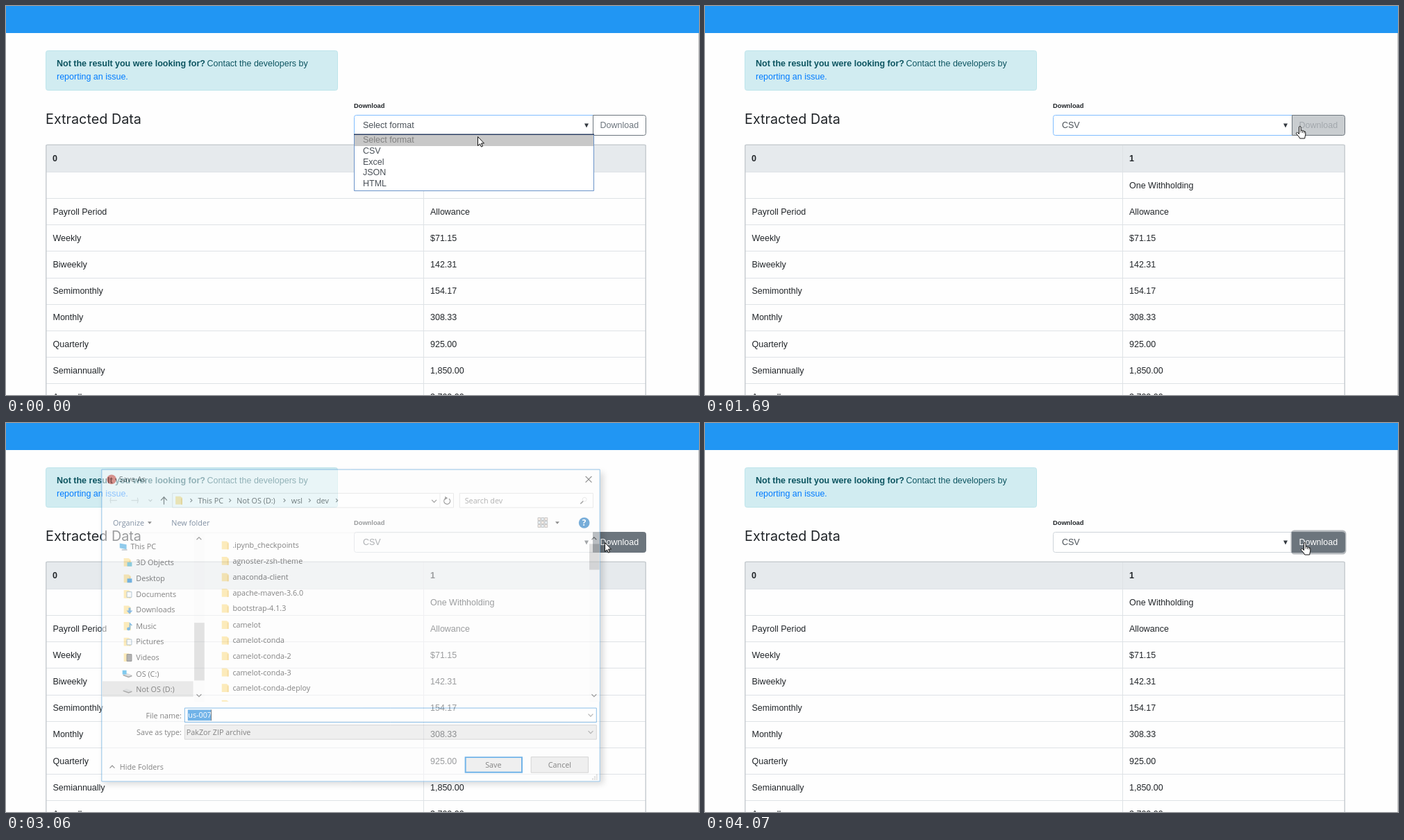
An HTML page with a canvas that plays this animation: 998 px wide and 561 px high, repeating every 5710 ms.

```html
<!DOCTYPE html>
<html lang="en">
<head>
<meta charset="utf-8">
<title>Extracted Data</title>
<style>
html, body { margin: 0; width: 100%; height: 100%; overflow: hidden; background: #fff; }
canvas { display: block; }
</style>
</head>
<body>
<canvas id="stage" width="998" height="561"></canvas>
<script>
const W = 998, H = 561, LOOP = 5710;
const stage = document.getElementById('stage').getContext('2d');
const layer = document.createElement('canvas');
layer.width = W;
layer.height = H;
const dlg = layer.getContext('2d');

const ARIAL = '"Liberation Sans", Arial, sans-serif';
const BODY = '12.5px ' + ARIAL;
const BOLD = 'bold 12.5px ' + ARIAL;
const UI = '11px "Open Sans", "Noto Sans", sans-serif';

const clamp = v => Math.max(0, Math.min(1, v));
const ramp = (t, from, to) => clamp((t - from) / (to - from));
const mix = (a, b, p) => a + (b - a) * p;
const blend = (a, b, p) => `rgb(${a.map((v, i) => Math.round(mix(v, b[i], p))).join(',')})`;

function text(c, str, x, y, color, font = BODY, align = 'left') {
  c.font = font;
  c.fillStyle = color;
  c.textAlign = align;
  c.fillText(str, x, y);
}
function fill(c, x, y, w, h, color) {
  c.fillStyle = color;
  c.fillRect(x, y, w, h);
}
function box(c, x, y, w, h, bg, border, radii = 0, line = 1) {
  c.beginPath();
  c.roundRect(x + line / 2, y + line / 2, w - line, h - line, radii);
  if (bg) { c.fillStyle = bg; c.fill(); }
  c.lineWidth = line;
  c.strokeStyle = border;
  c.stroke();
}
function trace(c, pts, color, width = 1.2) {
  c.beginPath();
  pts.forEach(([x, y]) => c.lineTo(x, y));
  c.lineWidth = width;
  c.strokeStyle = color;
  c.stroke();
}
function poly(c, pts, color) {
  c.beginPath();
  pts.forEach(([x, y]) => c.lineTo(x, y));
  c.closePath();
  c.fillStyle = color;
  c.fill();
}
function disc(c, x, y, r, color) {
  c.beginPath();
  c.arc(x, y, r, 0, 7);
  c.fillStyle = color;
  c.fill();
}
const triangle = (c, x, y, w, h, color) =>
  poly(c, [[x - w / 2, y - h / 2], [x + w / 2, y - h / 2], [x, y + h / 2]], color);

// dir: 'u', 'd' or 'r'
function chevron(c, x, y, dir, color = '#555', s = 3.5) {
  const k = s / 2;
  const pts = {
    u: [[x - s, y + k], [x, y - k], [x + s, y + k]],
    d: [[x - s, y - k], [x, y + k], [x + s, y - k]],
    r: [[x - k, y - s], [x + k, y], [x - k, y + s]]
  };
  trace(c, pts[dir], color);
}

/* ---------- web page ---------- */
const ROWS = [
  ['', 'One Withholding'], ['Payroll Period', 'Allowance'], ['Weekly', '$71.15'],
  ['Biweekly', '142.31'], ['Semimonthly', '154.17'], ['Monthly', '308.33'],
  ['Quarterly', '925.00'], ['Semiannually', '1,850.00'], ['Annually', '3,700.00']
];
const FORMATS = ['Select format', 'CSV', 'Excel', 'JSON', 'HTML'];

function drawTable(c) {
  fill(c, 57, 200, 865, 39, '#e6eaed');
  const grid = '#dee2e6';
  for (let i = 0; i < 9; i++) fill(c, 57, Math.round(238.8 + 38.2 * i), 865, 1, grid);
  fill(c, 601, 200, 1, 361, grid);
  box(c, 57, 199.5, 865, 400, null, '#c8cdd1', 2, 1.5);
  text(c, '0', 67, 224, '#212529', BOLD);
  text(c, '1', 611, 224, '#212529', BOLD);
  ROWS.forEach((row, i) => {
    const y = Math.round(262.6 + 38.15 * i);
    text(c, row[0], 67.5, y, '#212529');
    text(c, row[1], 611, y, '#212529');
  });
}

function drawForm(c, t) {
  const picked = t >= 1025;
  const leave = ramp(t, 2020, 2170);
  const hover = ramp(t, 1640, 1780);
  const ring = t >= 2860 && t < 4070 ? 0 : leave;

  text(c, 'Download', 501, 147, '#212529', 'bold 9.3px ' + ARIAL);
  box(c, 501, 157, 346, 30, '#fff', blend([128, 189, 255], [206, 212, 218], leave), [3, 0, 0, 3]);
  text(c, picked ? 'CSV' : FORMATS[0], 514, 176, '#495057');
  triangle(c, 836, 172.5, 6, 6, '#343a40');

  if (ring) box(c, 843.5, 154.5, 80, 35, null, `rgba(108,117,125,${0.5 * ring})`, 4, 2.5);
  box(c, 845, 157, 77, 30, blend([255, 255, 255], [108, 117, 125], hover), '#6c757d', [0, 3, 3, 0]);
  text(c, 'Download', 855.5, 176, blend([108, 117, 125], [255, 255, 255], hover));
}

function drawMenu(c, active) {
  box(c, 501, 185, 346, 82, '#fff', '#6a93c9');
  fill(c, 501, 184.5, 346, 1.5, '#2c3f63');
  fill(c, 502, active ? 202 : 186, 344, 16, active ? '#1e90ff' : '#c8c8c8');
  FORMATS.forEach((name, i) => {
    const color = i === 0 ? '#808080' : i === active ? '#fff' : '#495057';
    text(c, name, 514, Math.round(197 + 15.8 * i), color);
  });
}

function drawPage(c, t) {
  fill(c, 0, 0, W, H, '#fefefe');
  fill(c, 997, 39, 1, 522, '#c9c9c9');
  fill(c, 0, 0, W, 39, '#2196f3');
  box(c, 57, 64, 421, 58, '#d1ecf1', '#bee5eb', 3);
  text(c, 'Not the result you were looking for?', 73, 87, '#0c5460', BOLD);
  text(c, 'Contact the developers by', 289.5, 87, '#0c5460');
  text(c, 'reporting an issue.', 73, 106, '#007bff');
  text(c, 'Extracted Data', 57, 170, '#212529', '19.8px Inter, sans-serif');
  drawTable(c);
  drawForm(c, t);
}

/* ---------- save dialog ---------- */
const PLACES = ['This PC', '3D Objects', 'Desktop', 'Documents', 'Downloads', 'Music',
  'Pictures', 'Videos', 'OS (C:)', 'Not OS (D:)'];
const FILES = ['.ipynb_checkpoints', 'agnoster-zsh-theme', 'anaconda-client', 'apache-maven-3.6.0',
  'bootstrap-4.1.3', 'camelot', 'camelot-conda', 'camelot-conda-2', 'camelot-conda-3',
  'camelot-conda-deploy', 'camelot-docs'];
const INK = '#222';

function folder(c, x, y) {
  poly(c, [[x - 5, y - 6], [x + 2, y - 6], [x + 5, y - 4], [x + 5, y + 6], [x - 5, y + 6]], '#fbdc86');
  fill(c, x + 3, y - 3, 2, 9, '#eec45c');
}

function placeIcon(c, i, y) {
  if (i === 0) {
    poly(c, [[157, y - 5], [167, y - 3], [167, y + 4], [157, y + 2]], '#38a3df');
    fill(c, 160, y + 4, 8, 1.5, '#8997a0');
  } else if (i > 7) {
    poly(c, [[162, y + 1], [167, y - 1], [175, y + 2], [170, y + 5]], '#c4c7c9');
    trace(c, [[162, y + 2], [170, y + 5], [175, y + 3]], '#666', 1.5);
    if (i === 8) fill(c, 161, y - 5, 6, 6, '#1ba1e2');
  } else {
    folder(c, 168, y);
    if (i === 3 || i === 6) box(c, 167, y - 4, 8, 9, '#f4f8fa', '#7c9db2');
    else if (i === 7) box(c, 167, y - 5, 8, 11, '#777', '#444');
    else if (i === 4) poly(c, [[170, y - 3], [173, y - 3], [173, y + 1], [176, y + 1], [171.5, y + 6], [167, y + 1], [170, y + 1]], '#2f86cf');
    else if (i === 5) {
      disc(c, 170, y + 4, 2.5, '#2188d0');
      trace(c, [[172, y + 4], [172, y - 4], [175, y - 1]], '#2188d0', 1.5);
    } else fill(c, 168, y, 7, 6, i === 1 ? '#43b3d0' : '#1685d5');
  }
}

function scrollbar(c, x, top, height, color) {
  fill(c, x - 7, 156, 15, 248, '#fafafa');
  fill(c, x - 7, top, 15, height, color);
  chevron(c, x, 164, 'u');
  chevron(c, x, 395, 'd');
}

function navigation(c) {
  const arrow = (x, d, color) => {
    trace(c, [[x - 5, 108], [x + 5, 108]], color);
    trace(c, [[x + d, 104], [x + d * 5 / 4, 108], [x + d, 112]], color);
  };
  arrow(148, -4, '#cfcfcf');
  arrow(179, 4, '#cfcfcf');
  chevron(c, 202, 108, 'd', '#bbb', 2.5);
  trace(c, [[222, 114], [222, 103]], '#444', 1.3);
  trace(c, [[217.5, 108], [222, 103], [226.5, 108]], '#444', 1.3);

  box(c, 234, 97, 414, 22, '#fff', '#d9d9d9');
  folder(c, 244, 108);
  [262, 319, 399, 436, 476].forEach(x => chevron(c, x, 108, 'r', '#555', 2.5));
  [['This PC', 272], ['Not OS (D:)', 329], ['wsl', 409], ['dev', 446]]
    .forEach(([s, x]) => text(c, s, x, 112, INK, UI));
  chevron(c, 619, 109, 'd');
  fill(c, 627, 98, 1, 20, '#dedede');
  c.beginPath();
  c.arc(638, 109, 4.5, -0.9, 4.3);
  c.strokeStyle = '#555';
  c.lineWidth = 1.3;
  c.stroke();
  poly(c, [[635, 102], [639, 104.5], [635, 107]], '#555');

  box(c, 656, 97, 197, 22, '#fff', '#d9d9d9');
  text(c, 'Search dev', 664, 112, '#777', UI);
  c.beginPath();
  c.arc(840, 106.5, 3, 0, 7);
  c.stroke();
  trace(c, [[838, 109], [834, 113]], '#555', 1.5);
}

function toolbar(c) {
  text(c, 'Organize', 147, 145, '#1e395b', UI);
  triangle(c, 201, 141, 6, 3.5, '#333');
  text(c, 'New folder', 233, 145, '#1e395b', UI);
  for (let i = 0; i < 9; i++) {
    box(c, 771 + (i % 3) * 5, 133 + Math.floor(i / 3) * 5, 5, 5, i % 2 ? '#d8e5ef' : '#f1dfd3', '#9a9a9a');
  }
  triangle(c, 800, 141, 6, 3.5, '#333');
  disc(c, 839.5, 141, 8, '#0c6cbc');
  text(c, '?', 839.5, 145.5, '#fff', 'bold 12px "Open Sans", sans-serif', 'center');
  fill(c, 131, 155, 731, 1, '#eeeeee');
}

function lists(c) {
  fill(c, 131, 374, 134, 23, '#d9d9d9');
  PLACES.forEach((name, i) => {
    const y = Math.round(176 + 23.35 * i);
    placeIcon(c, i, y);
    text(c, name, i ? 181 : 173, y + 4, INK, UI);
  });
  scrollbar(c, 273.5, 288, 85, '#cdcdcd');

  c.save();
  c.beginPath();
  c.rect(290, 156, 556, 248);
  c.clip();
  FILES.forEach((name, i) => {
    const y = Math.round(174 + 23.35 * i);
    folder(c, 312, y);
    text(c, name, 323, y + 4, INK, UI);
  });
  c.restore();
  scrollbar(c, 854, 172, 38, '#c4c4c4');
}

function fields(c, focused, caret) {
  text(c, 'File name:', 248, 429, INK, UI, 'right');
  box(c, 252, 413, 606, 22, '#fff', '#2b8ad6');
  if (focused) fill(c, 257, 416, 35, 16, '#0078d7');
  text(c, 'us-007', 257.5, 428, focused ? '#fff' : INK, UI);
  if (caret) fill(c, 291, 416, 1, 16, '#222');
  chevron(c, 849, 424, 'd', '#777');

  text(c, 'Save as type:', 248, 453, INK, UI, 'right');
  box(c, 252, 438, 606, 22, '#e3e3e3', '#b9b9b9');
  text(c, 'PakZor ZIP archive', 255, 453, INK, UI);
  chevron(c, 849, 449, 'd', '#777');

  chevron(c, 146, 500, 'u', '#333');
  text(c, 'Hide Folders', 157, 504, INK, UI);
  box(c, 664, 485, 85, 24, '#e3e3e3', '#0078d7', 0, 2);
  text(c, 'Save', 706, 501, INK, UI, 'center');
  box(c, 761, 485, 85, 24, '#e3e3e3', '#b3b3b3');
  text(c, 'Cancel', 803.5, 501, INK, UI, 'center');
  for (let i = 0; i < 3; i++) {
    for (let j = 2 - i; j < 3; j++) fill(c, 851 + j * 3, 511 + i * 3, 2, 2, '#bbb');
  }
}

function drawDialog(t) {
  const opening = ramp(t, 2870, 3215);
  const closing = ramp(t, 3800, 3955);
  const alpha = opening * (1 - closing);
  if (!alpha) return;
  const scale = mix(0.9, 1, 1 - (1 - opening) ** 2) - 0.07 * closing ** 2;
  const focused = t < 3800, c = dlg;

  c.setTransform(1, 0, 0, 1, 0, 0);
  c.clearRect(0, 0, W, H);
  c.translate(496.5, 292);
  c.scale(scale, scale);
  c.translate(-496.5, -292);

  c.save();
  c.shadowColor = focused ? 'rgba(0,0,0,.28)' : 'rgba(0,0,0,.16)';
  c.shadowBlur = 9;
  c.shadowOffsetX = 4;
  c.shadowOffsetY = 4;
  fill(c, 130, 62, 733, 460, '#fdfdfd');
  c.restore();
  box(c, 130, 62, 733, 460, '#fdfdfd', focused ? '#3c93d6' : '#6aa5d4');

  if (focused) disc(c, 145, 77, 7, '#db4a3d');
  text(c, 'Save As', focused ? 156 : 138, 81, INK, UI);
  trace(c, [[841.5, 72.5], [850.5, 81.5]], '#333');
  trace(c, [[850.5, 72.5], [841.5, 81.5]], '#333');
  navigation(c);
  toolbar(c);
  lists(c);
  fields(c, focused, focused && t < 3500);

  stage.globalAlpha = alpha;
  stage.drawImage(layer, 0, 0);
  stage.globalAlpha = 1;
}

/* ---------- pointer ---------- */
const ARROW = new Path2D('M0 0V13L3 10.3L5 14.6L7 13.7L5 9.5H9Z');
const HAND = new Path2D('M0 1.5Q0 0 1.3 0Q2.6 0 2.6 1.5V6Q4.6 5 5 6.6Q7 5.8 7.4 7.4' +
  'Q9.3 6.9 9.3 9V12.5Q8.6 14 8.2 17.5H1.2Q0 14.5-3.8 11Q-4.6 9.4-3.2 8.8Q-1.8 8.8 0 11Z');

function pointer(t) {
  if (t < 610) {
    const p = Math.sin(ramp(t, 0, 550) * Math.PI / 2);
    return [mix(679, 672, p), mix(188, 205, p)];
  }
  if (t < 790) return null;
  if (t < 1290) return [671, 199];
  const p = Math.sin(ramp(t, 1290, 1780) * Math.PI / 2);
  return [mix(684, 862, p), mix(205, 172, p)];
}

function drawPointer(c, pos, hand) {
  if (!pos) return;
  c.save();
  c.translate(Math.round(pos[0]) + 0.5, Math.round(pos[1]) + 0.5);
  c.fillStyle = '#fff';
  c.strokeStyle = '#111';
  c.lineWidth = 1;
  c.lineJoin = 'round';
  const shape = hand ? HAND : ARROW;
  c.fill(shape);
  c.stroke(shape);
  if (hand) {
    trace(c, [[5, 6.6], [5, 9.5]], '#111', 0.8);
    trace(c, [[7.4, 7.4], [7.4, 10]], '#111', 0.8);
    trace(c, [[2.6, 6], [2.6, 9]], '#111', 0.8);
  }
  c.restore();
}

function render(now) {
  const t = now % LOOP;
  const pos = pointer(t);
  drawPage(stage, t);
  if (t < 1010) drawMenu(stage, t >= 610 || pos[1] >= 202 ? 1 : 0);
  drawDialog(t);
  drawPointer(stage, pos, t >= 4070 || (t >= 1640 && t < 2550));
}

const start = performance.now();
function tick() {
  render(performance.now() - start);
  requestAnimationFrame(tick);
}
tick();
</script>
</body>
</html>
```
